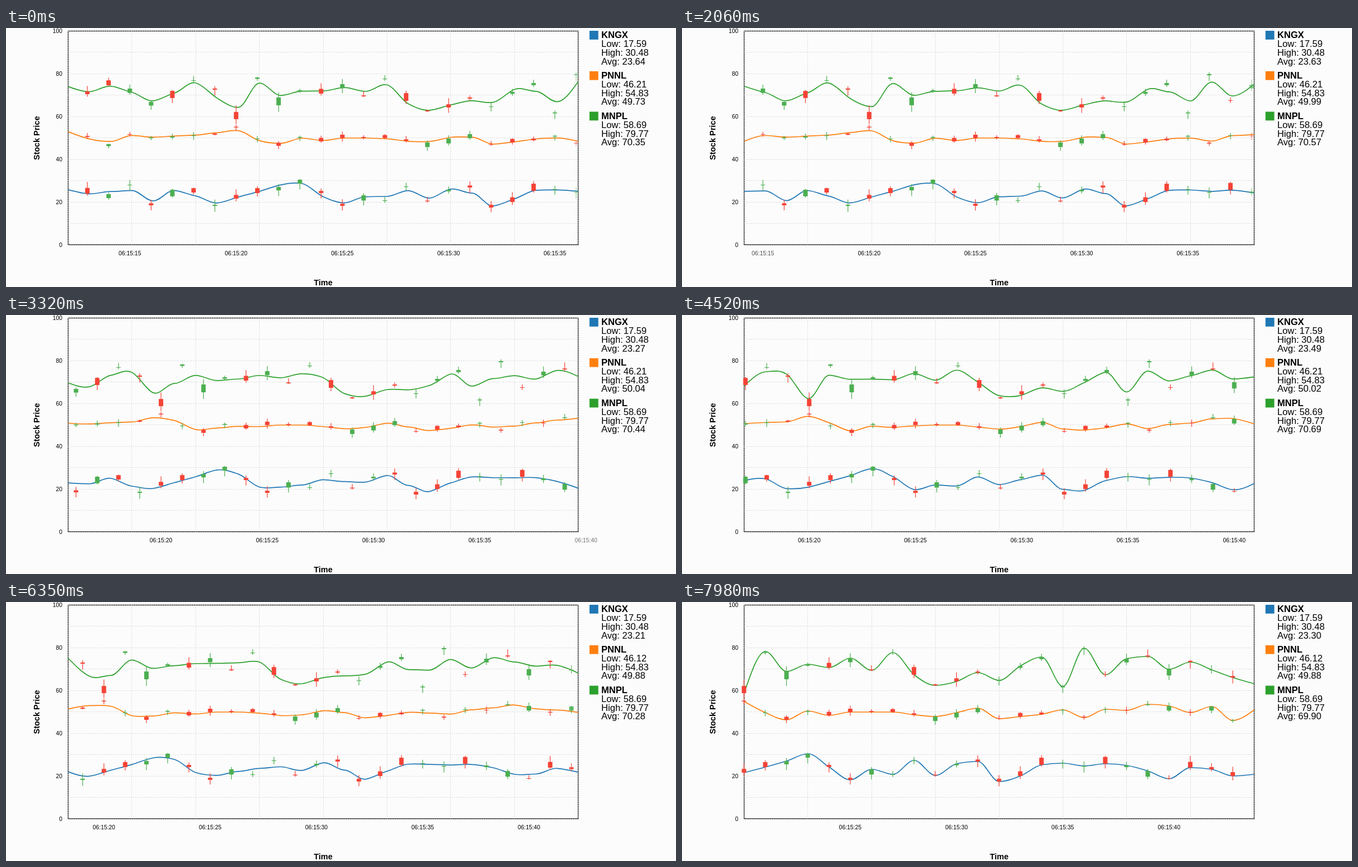
Write an HTML page with a canvas that moves like this. It is 1202 by 466 pixels and loops after 8000 ms.

```html
<!DOCTYPE html>
<html lang="en">
<head>
<meta charset="utf-8">
<title>Stock prices</title>
<style>
html, body { margin: 0; width: 100%; height: 100%; overflow: hidden; background: #fcfcfc; }
canvas { display: block; width: 1202px; height: 466px; }
</style>
</head>
<body>
<canvas id="chart"></canvas>
<script>
const W = 1202, H = 466, LOOP = 8000;
const LEFT = 111.5, RIGHT = 1026.5, TOP = 5.5, BOTTOM = 390;
const SPAN = 24, STEP = (RIGHT - LEFT) / SPAN, X0 = 111.2;
const FIRST = 12;                      // second of the first closing price
const FONT = '"Liberation Sans", Arial, sans-serif';
const UP = '#4caf50', DOWN = '#f44336';

// Start of each one-second slide, in ms
const starts = [-280, 680, 1760, 2776, 3779, 4850, 5925, 6965];

// path: height of each closing price on the stage; a minus marks a falling candle.
// swing: typical size of a candle.
const series = [
  {
    name: 'KNGX', color: '#1f77b4', swing: 5,
    low: n => '17.59', high: '30.48',
    avg: ['23.64', '23.69', '23.63', '23.27', '23.49', '23.39', '23.21', '23.30'],
    path: [288, -298, 299, 282, -319, 291, -296, 318, -307, -297, 286, 273, -297, -320, 301, 310, 285,
      -312, 291, -287, -323, -313, -293, 290, 295, -291, 294, 304, -318, -298, -301, -313, 310]
  },
  {
    name: 'PNNL', color: '#ff7f0e', swing: 3.2,
    low: n => n < 6 ? '46.21' : '46.12', high: '54.83',
    avg: ['49.73', '49.74', '49.99', '50.04', '50.02', '50.09', '49.88', '49.88'],
    path: [183, -196, 209, -192, 197, 195, 193, -192, -179, 199, -212, 196, -204, -198, -198, -198, -203,
      206, 199, 191, -210, -206, -202, 194, -208, 193, -195, 184, 187, -199, 188, 213, 194]
  },
  {
    name: 'MNPL', color: '#2ca02c', swing: 5.5,
    low: n => '58.69', high: '79.77',
    avg: ['70.35', '70.52', '70.57', '70.44', '70.69', '70.72', '70.28', '69.90'],
    path: [100, -119, -103, 109, 133, -126, 94, -111, -164, 89, 125, 112, -118, 101, -123, 91, -131,
      -150, -143, -127, 141, 115, 99, 152, 83, -131, 102, -98, 121, -108, 122, -136, 147]
  }
];

let seed = 15;
function random() {
  seed = (seed * 16807) % 2147483647;
  return seed / 2147483647;
}

for (const s of series) {
  s.closes = s.path.map(Math.abs);
  s.candles = s.path.map(v => {
    const rising = v > 0, close = Math.abs(v);
    const body = 1 + 2.4 * s.swing * random() ** 2;
    const top = rising ? close : close - body;
    const wick = () => 1 + 2 * s.swing * random();
    return { color: rising ? UP : DOWN, top, body, high: top - wick(), low: top + body + wick() };
  });
}

const canvas = document.getElementById('chart');
const ctx = canvas.getContext('2d');
const ratio = window.devicePixelRatio || 1;
canvas.width = W * ratio;
canvas.height = H * ratio;

const lerp = (a, b, u) => a + (b - a) * u;
const cubicInOut = u => u < 0.5 ? 4 * u ** 3 : 1 - 4 * (1 - u) ** 3;

// Monotone tangents, as change per step
function tangents(y) {
  const d = y.slice(1).map((v, i) => v - y[i]);
  const m = y.map((_, i) => {
    const a = d[i - 1], b = d[i];
    if (a === undefined || b === undefined) return 0;
    return (Math.sign(a) + Math.sign(b)) * Math.min(Math.abs(a), Math.abs(b), Math.abs(a + b) / 4);
  });
  const last = y.length - 1;
  m[0] = (3 * d[0] - m[1]) / 2;
  m[last] = (3 * d[last - 1] - m[last - 1]) / 2;
  return m;
}

function text(str, x, y, size, align = 'left', weight = 'normal') {
  ctx.font = `${weight} ${size}px ${FONT}`;
  ctx.textAlign = align;
  ctx.fillText(str, x, y);
}

function segment(x1, y1, x2, y2) {
  ctx.beginPath();
  ctx.moveTo(x1, y1);
  ctx.lineTo(x2, y2);
  ctx.stroke();
}

function drawFrame() {
  ctx.lineWidth = 1.3;
  ctx.strokeStyle = '#000';
  ctx.strokeRect(LEFT, TOP, RIGHT - LEFT, BOTTOM - TOP);

  ctx.lineWidth = 1;
  ctx.strokeStyle = '#d8d8d8';
  ctx.setLineDash([2, 2]);
  for (let i = 0; i <= 10; i++) {
    const y = Math.floor(lerp(TOP, BOTTOM, i / 10)) + 0.5;
    ctx.globalAlpha = i % 10 ? 1 : 0.6;
    segment(LEFT, y, RIGHT, y);
  }
  for (let i = 0; i <= 8; i++) {
    const x = Math.floor(lerp(LEFT, RIGHT, i / 8)) + 0.5;
    ctx.globalAlpha = i % 8 ? 1 : 0.6;
    segment(x, TOP, x, BOTTOM);
  }
  ctx.globalAlpha = 1;
  ctx.setLineDash([]);

  ctx.fillStyle = '#000';
  for (let v = 0; v <= 100; v += 20) {
    text(v, 101, lerp(BOTTOM, TOP, v / 100) + 3.8, 10.4, 'right');
  }
  text('Time', 569, 463, 14.5, 'center', 'bold');
  ctx.save();
  ctx.translate(59.5, 198);
  ctx.rotate(-Math.PI / 2);
  text('Stock Price', 0, 0, 14.5, 'center', 'bold');
  ctx.restore();
}

function drawTicks(n, u, x) {
  ctx.fillStyle = '#000';
  const from = FIRST + n + 1, to = from + SPAN;
  for (let s = Math.ceil(from / 5) * 5; s <= to; s += 5) {
    ctx.globalAlpha = s === from ? 1 - u : s === to ? u : 1;
    text('06:15:' + s, x(s), 408.6, 10.4, 'center');
  }
  ctx.globalAlpha = 1;
}

function drawLine(s, n, u) {
  const a = s.closes.slice(n, n + SPAN + 1), b = s.closes.slice(n + 1, n + SPAN + 2);
  const ma = tangents(a), mb = tangents(b);
  const y = a.map((v, i) => lerp(v, b[i], u));
  const m = ma.map((v, i) => lerp(v, mb[i], u));
  ctx.strokeStyle = s.color;
  ctx.lineWidth = 1.7;
  ctx.beginPath();
  ctx.moveTo(LEFT, y[0]);
  for (let i = 1; i <= SPAN; i++) {
    const px = LEFT + i * STEP;
    ctx.bezierCurveTo(px - STEP * 2 / 3, y[i - 1] + m[i - 1] / 3, px - STEP / 3, y[i] - m[i] / 3, px, y[i]);
  }
  ctx.stroke();
}

function drawCandles(s, n, u, x) {
  for (let i = n + 1; i <= n + SPAN; i++) {
    const c = s.candles[i], px = x(FIRST + i);
    ctx.globalAlpha = i === n + SPAN ? Math.min(1, u * 2) : 1;
    ctx.fillStyle = c.color;
    ctx.fillRect(px - 0.6, c.high, 1.2, c.low - c.high);
    ctx.fillRect(px - 4, c.top, 8, c.body);
  }
  ctx.globalAlpha = 1;
}

function drawLegend(n) {
  series.forEach((s, i) => {
    const y = 5 + i * 72.8;
    ctx.fillStyle = s.color;
    ctx.fillRect(1046.8, y, 15.8, 15.8);
    ctx.fillStyle = '#000';
    text(s.name, 1068, y + 13, 16.6, 'left', 'bold');
    const rows = ['Low: ' + s.low(n), 'High: ' + s.high, 'Avg: ' + s.avg[n]];
    rows.forEach((row, j) => text(row, 1068, y + 29.2 + j * 15.7, 16.6));
  });
}

function draw(t) {
  let n = starts.length - 1;
  while (starts[n] > t) n--;
  const u = Math.min(1, (t - starts[n]) / 1000);
  const left = FIRST + n + cubicInOut(u);
  const x = s => X0 + (s - left) * STEP;

  ctx.setTransform(ratio, 0, 0, ratio, 0, 0);
  ctx.fillStyle = '#fcfcfc';
  ctx.fillRect(0, 0, W, H);
  drawFrame();
  drawTicks(n, u, x);
  for (const s of series) drawLine(s, n, u);
  for (const s of series) drawCandles(s, n, u, x);
  drawLegend(n);
}

const begin = performance.now();
function tick() {
  draw((performance.now() - begin) % LOOP);
  requestAnimationFrame(tick);
}
tick();
</script>
</body>
</html>
```
